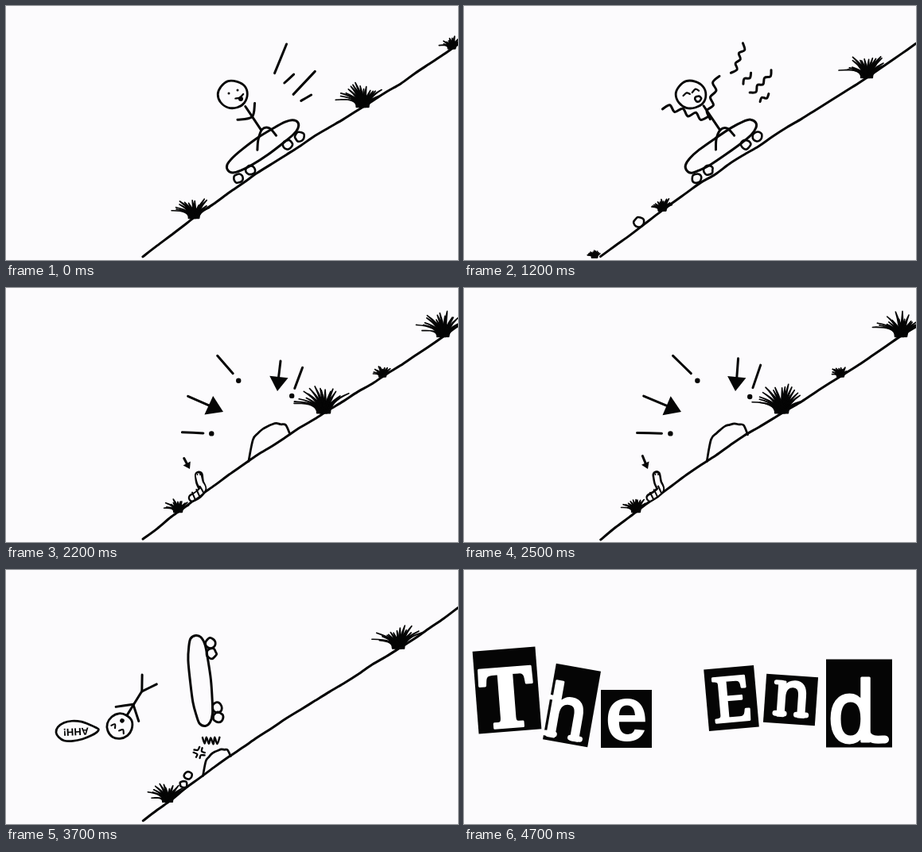
Write an HTML page with a canvas that moves like this. It is 568 by 320 pixels and loops after 4900 ms.

```html
<!DOCTYPE html>
<html lang="en">
<head>
<meta charset="utf-8">
<title>Downhill</title>
<style>
  html, body { margin: 0; width: 100%; height: 100%; overflow: hidden; background: #fcfbfd; }
  canvas { display: block; width: 568px; height: 320px; }
</style>
</head>
<body>
<canvas id="stage" width="568" height="320"></canvas>
<script>
const W = 568, H = 320, LOOP = 4900, POSES = 20, STEP = LOOP / POSES;
const PAPER = '#fcfbfd', INK = '#050505', TAU = Math.PI * 2;
const stage = document.getElementById('stage').getContext('2d');
let c, rnd; // context and random source of the drawing in progress

const mix = (a, b, u) => a + (b - a) * u;
const span = (n, fn) => Array.from({ length: n + 1 }, (_, i) => fn(i / n));

function seeded(s) {
  return () => {
    s = (s + 0x6D2B79F5) | 0;
    let t = Math.imul(s ^ (s >>> 15), 1 | s);
    t = (t + Math.imul(t ^ (t >>> 7), 61 | t)) ^ t;
    return ((t ^ (t >>> 14)) >>> 0) / 4294967296;
  };
}

// ---- pen: smooth strokes with a slightly unsteady hand ----
function curve(points, width = 3, closed = false) {
  const p = points.map(([x, y]) => [x + rnd() - 0.5, y + rnd() - 0.5]), n = p.length;
  const at = i => closed ? p[(i + n) % n] : p[Math.max(0, Math.min(n - 1, i))];
  c.beginPath();
  c.moveTo(...p[0]);
  for (let i = 0; i < n - !closed; i++) {
    const [a, b, d, e] = [at(i - 1), at(i), at(i + 1), at(i + 2)];
    c.bezierCurveTo(b[0] + (d[0] - a[0]) / 6, b[1] + (d[1] - a[1]) / 6,
      d[0] - (e[0] - b[0]) / 6, d[1] - (e[1] - b[1]) / 6, ...d);
  }
  c.lineWidth = width;
  c.stroke();
}
const line = (x1, y1, x2, y2, width) => curve([[x1, y1], [x2, y2]], width);
// closed shape from a function of the angle
const loop = (n, fn, width) => curve(span(n, u => fn(u * TAU)).slice(1), width, true);
const ring = (x, y, r, width = 2.6) =>
  loop(10, a => [x + r * Math.cos(a), y + r * 0.94 * Math.sin(a)], width);
function dot(x, y, r) {
  c.beginPath();
  c.arc(x, y, r, 0, TAU);
  c.fill();
}
function wave(x1, y1, x2, y2, amp, bends) {
  const len = Math.hypot(x2 - x1, y2 - y1), nx = (y1 - y2) / len, ny = (x2 - x1) / len;
  curve(span(bends, u => {
    const a = amp * Math.cos(u * bends * Math.PI);
    return [mix(x1, x2, u) + nx * a, mix(y1, y2, u) + ny * a];
  }));
}
function placed(x, y, deg, scale, draw) {
  c.save();
  c.translate(x, y);
  c.rotate(deg * Math.PI / 180);
  c.scale(scale, scale);
  draw();
  c.restore();
}

// ---- scenery ----
function slopeY(x) {
  const u = (x - 172) / (W - 172);
  return mix(316, 48, u) - 9 * Math.sin(1.25 * Math.PI * u) * (1 - u * u);
}
function ground() {
  curve(span(22, u => {
    const x = mix(172, W, u);
    return [x, slopeY(x) + (rnd() - 0.5) * 1.5];
  }));
}
function tuft(x, h) {
  const y = Math.min(317, slopeY(x)), n = Math.round(6 + h / 3.5);
  span(n, u => {
    const a = mix(-1.2, 0.85, u) + (rnd() - 0.5) * 0.15, len = h * mix(0.65, 1.05, rnd());
    const root = x + (u - 0.5) * h * 0.35, tx = root + len * Math.sin(a), ty = y - len * Math.cos(a);
    c.beginPath();
    c.moveTo(root - 2, y);
    c.quadraticCurveTo(root - 1, y - len * 0.4, tx, ty);
    c.quadraticCurveTo(root + 2, y - len * 0.4, root + 2, y);
    c.lineWidth = 1.6;
    c.fill();
    c.stroke();
  });
}
function rock(x, w) {
  curve(span(9, u => {
    const lift = Math.sqrt(Math.max(0, Math.sin(Math.PI * u ** 0.7)));
    return [x + w * u, mix(slopeY(x), slopeY(x + w), u) - w * 0.56 * lift + 1.4 * Math.sin(u * 28)];
  }), 2.7);
}
function worm() {
  const body = [[234, 264], [241, 260], [247, 253], [244, 245], [242, 236]];
  curve(body, 11);
  c.strokeStyle = PAPER;
  curve(body, 6);
  c.strokeStyle = INK;
  for (let i = 0; i < 3; i++) line(234 + i * 5, 258 - i * 4, 238 + i * 5, 266 - i * 4, 2);
  dot(240.5, 235, 1);
  dot(244, 235, 1);
}
function arrow(x1, y1, x2, y2, size) {
  line(x1, y1, mix(x1, x2, 0.7), mix(y1, y2, 0.7));
  placed(x2, y2, Math.atan2(y2 - y1, x2 - x1) * 360 / TAU, size, () => {
    c.beginPath();
    c.lineTo(0, 0);
    c.lineTo(-1, -0.65);
    c.lineTo(-1, 0.65);
    c.fill();
  });
}
function bang(x1, y1, x2, y2) {
  line(x1, y1, x2, y2);
  dot(mix(x1, x2, 1.38), mix(y1, y2, 1.38), 3.2);
}
function speedLines(wavy) {
  const draw = wavy ? wave : (...p) => line(...p.slice(0, 4));
  draw(353, 48, 338, 85, 2.5, 6);
  draw(362, 86, 350, 97, 2, 3);
  draw(388, 82, 361, 111, 2.5, 6);
  draw(384, 112, 371, 119, 2, 3);
}
function impact() {
  curve(span(8, u => [mix(247, 268, u), 215 + (u * 8 % 2 ? 4 : -4)]), 2.4);
  for (let i = 0; i < 4; i++) {
    placed(243, 230, i * 90 + 15, 1, () => curve([[2, 7], [2.5, 2.5], [7, 2]], 2.3));
  }
}

// ---- board and riders ----
const power = (v, e) => Math.sign(v) * Math.abs(v) ** e;
function board(x, y, deg, scale, gap) {
  placed(x, y, deg, scale, () => {
    loop(16, a => [53 * power(Math.cos(a), 0.8), 12 * power(Math.sin(a), 0.7) - 1.5], 3 / scale);
    for (const side of [-39, 36]) {
      ring(side - gap / 2, 14.5, 6);
      ring(side + gap / 2, 14.5, 6);
    }
  });
}
function eye(x, y, smiling) {
  if (smiling) curve([[x - 4, y + 3], [x, y - 1], [x + 4, y + 1]], 2.2);
  else dot(x, y, 1.5);
}
function skater(mood) {
  const calm = mood === 'calm';
  ring(285, 111.5, 18.5, 2.8);
  eye(280, 110, mood === 'glee');
  eye(291, 106, mood === 'glee');
  if (calm) {
    curve([[288, 116], [294, 116], [298, 111]], 2.2);
    dot(295, 117, 3);
    curve([[291, 143], [309, 140], [313, 122]]);
  } else {
    ring(294, 117, 3.8);
    wave(306, 142, 250, 126, 3.5, 7);
    wave(306, 142, 318, 88, 3, 6);
  }
  line(301, 126, 321, 156);
  curve([[316, 181], [317, 168], [322, 156], [331, 154], [340, 163]]);
  board(323.5, 178, -34.5, 1, 18);
}
// head at the origin, body along x
function flyer(x, y, deg, r) {
  placed(x, y, deg, 1, () => {
    ring(0, 0, r, 2.8);
    line(r, 0, 52, 0);
    for (const side of [-1, 1]) {
      line(32, 0, 18, side * 17);
      line(52, 0, 70, side * 11);
      curve([[-5, side * 6 - 3], [-1, side * 6], [-5, side * 6 + 3]], 2.1);
    }
    dot(7.5, -1, 2.8);
  });
}
function bubble(text, x, y, deg) {
  placed(x, y, deg, 1, () => {
    loop(14, a => [-27 * Math.cos(a), 15 * Math.sin(a) * Math.sin(a / 2) ** 0.6], 2.7);
    c.font = 'bold 13px "Liberation Sans", sans-serif';
    c.textAlign = 'center';
    c.textBaseline = 'middle';
    c.fillText(text, 2, 0);
  });
}

// ---- closing title: each letter is sized to fill its card ----
const SERIF = '"Noto Serif", serif', MONO = '"DejaVu Sans Mono", monospace', SANS = '"Liberation Sans", sans-serif';
function card(ch, x, y, w, h, deg, family, dx, dy) {
  placed(x, y, deg, 1, () => {
    c.fillRect(-w / 2, -h / 2, w, h);
    c.fillStyle = c.strokeStyle = '#fff';
    c.textAlign = 'center';
    c.textBaseline = 'alphabetic';
    const font = size => { c.font = `${'The'.includes(ch) && family !== MONO ? 'bold ' : ''}${size}px ${family}`; };
    font(100);
    const size = h * 72 / c.measureText(ch).actualBoundingBoxAscent;
    font(size);
    const base = dy + h * 0.36, stem = size * 0.175;
    c.lineWidth = family === SANS ? 0.01 : 3;
    c.fillText(ch, dx, base);
    c.strokeText(ch, dx, base);
    if (ch === 'd') {
      curve([[7, -18], [10, -5], [18, 0], [33, 0]].map(([a, b]) => [a, b + base - 3]), 10);
    } else if (family === MONO) {
      for (const side of [-stem, stem]) line(dx + side - 6, base - 3, dx + side + 6, base - 3, 7);
      line(dx - stem - 7, base - size * 0.53, dx - stem, base - size * 0.53, 6);
    }
  });
}
function title(k) {
  const s = 1.4 * (POSES - 1 - k); // the cards settle in the last pose
  card('T', 54 + s, 151.5 + s, 79, 104, -4.4 + s, SERIF, -1, 9);
  card('h', 135.5 + s, 170.5 - s, 57, 97, 10 - s, MONO, -5, 8);
  card('e', 204 + s, 187.5 + s, 64, 73, s, SANS, 0, 1);
  card('E', 336 + s, 161.5 - s, 63, 78, -5 - s, SERIF, 0, 1);
  card('n', 410.5 + s, 163.5 + s, 65, 61, 4 + s, MONO, 1, -1);
  card('d', 496.5 + s, 168 - s, 83, 111, -s, MONO, -9, 8);
}

// ---- shots: n counts the poses since the shot began ----
const scroll = (x, n) => 160 + (x - 160 + 120 * n) % 420;
const hidden = x => x > 265 && x < 375; // behind the skater
function ride(tufts, mood, wavy, n) {
  ground();
  for (const [x, h] of tufts) {
    const at = scroll(x, n);
    if (!hidden(at)) tuft(at, h);
  }
  speedLines(wavy);
  skater(mood);
}
const start = (k, n) => ride([[236, 26], [448, 33], [560, 15]], 'calm', false, n);
function faster(k, n) {
  ride([[179, 25], [236, 38], [479, 38], [540, 52]], 'shout', true, n);
  if (n < 2) bubble('WOO!', 299, 59, -52);
}
function fastest(k, n) {
  ride([[164, 9], [249, 16], [506, 30]], 'glee', true, n);
  const x = scroll(220, n);
  if (!hidden(x)) ring(x, slopeY(x) - 7, 6.5);
}
function danger(k, n) {
  const j = (n - 1) * 3;
  ground();
  [[216, 18], [399, 36], [473, 13], [549, 31]].forEach(t => tuft(...t));
  rock(305, 52);
  worm();
  arrow(229 - j, 136, 273, 156, 20);
  arrow(345, 92 - j, 341, 130, 18);
  arrow(224, 215 - j, 231, 228, 8);
  bang(266 - j, 85, 285, 108);
  bang(221 - j, 182, 248, 183);
  bang(373, 100 - j, 363, 126);
}
function crash(k, n) {
  ground();
  tuft(203, 24);
  tuft(493, 31);
  rock(247, 35);
  ring(229, 259, 5);
  ring(223, 270, 4.5);
  if (n === 0) return skater('shout');
  const e = 1 - (1 - (n - 1) / 5) ** 3; // thrown hard, then slowing
  const x = mix(227, 137, e), y = mix(134, 201, e);
  impact();
  flyer(x, y, mix(31, -63.5, e), mix(14.5, 16.5, e));
  board(mix(284, 243.4, e), mix(171, 136.8, e), mix(-59, -98.5, e), mix(0.79, 1.1, e), 12);
  if (n > 3) bubble('AHH!', x - 53, y + 6, 177);
}
const SHOTS = [[0, start], [2, faster], [5, fastest], [8, danger], [11, crash], [18, title]];

const sheets = Array.from({ length: POSES }, (_, k) => {
  const sheet = document.createElement('canvas');
  sheet.width = W;
  sheet.height = H;
  c = sheet.getContext('2d');
  rnd = seeded(k * 7919 + 17);
  c.fillStyle = PAPER;
  c.fillRect(0, 0, W, H);
  c.fillStyle = c.strokeStyle = INK;
  c.lineCap = c.lineJoin = 'round';
  const [from, draw] = SHOTS.filter(s => s[0] <= k).pop();
  draw(k, k - from);
  return sheet;
});

// Poses change on tenths of a second; a late change shows one tenth half mixed.
const began = performance.now();
function tick() {
  const t = (performance.now() - began) % LOOP, tenth = Math.floor(t / 100) * 100;
  const k = Math.min(POSES - 1, Math.floor((tenth + 99) / STEP));
  const blending = k > 0 && k * STEP - tenth >= 40;
  stage.globalAlpha = 1;
  stage.drawImage(sheets[blending ? k - 1 : k], 0, 0);
  if (blending) {
    stage.globalAlpha = 0.5;
    stage.drawImage(sheets[k], 0, 0);
  }
  requestAnimationFrame(tick);
}
tick();
</script>
</body>
</html>
```
